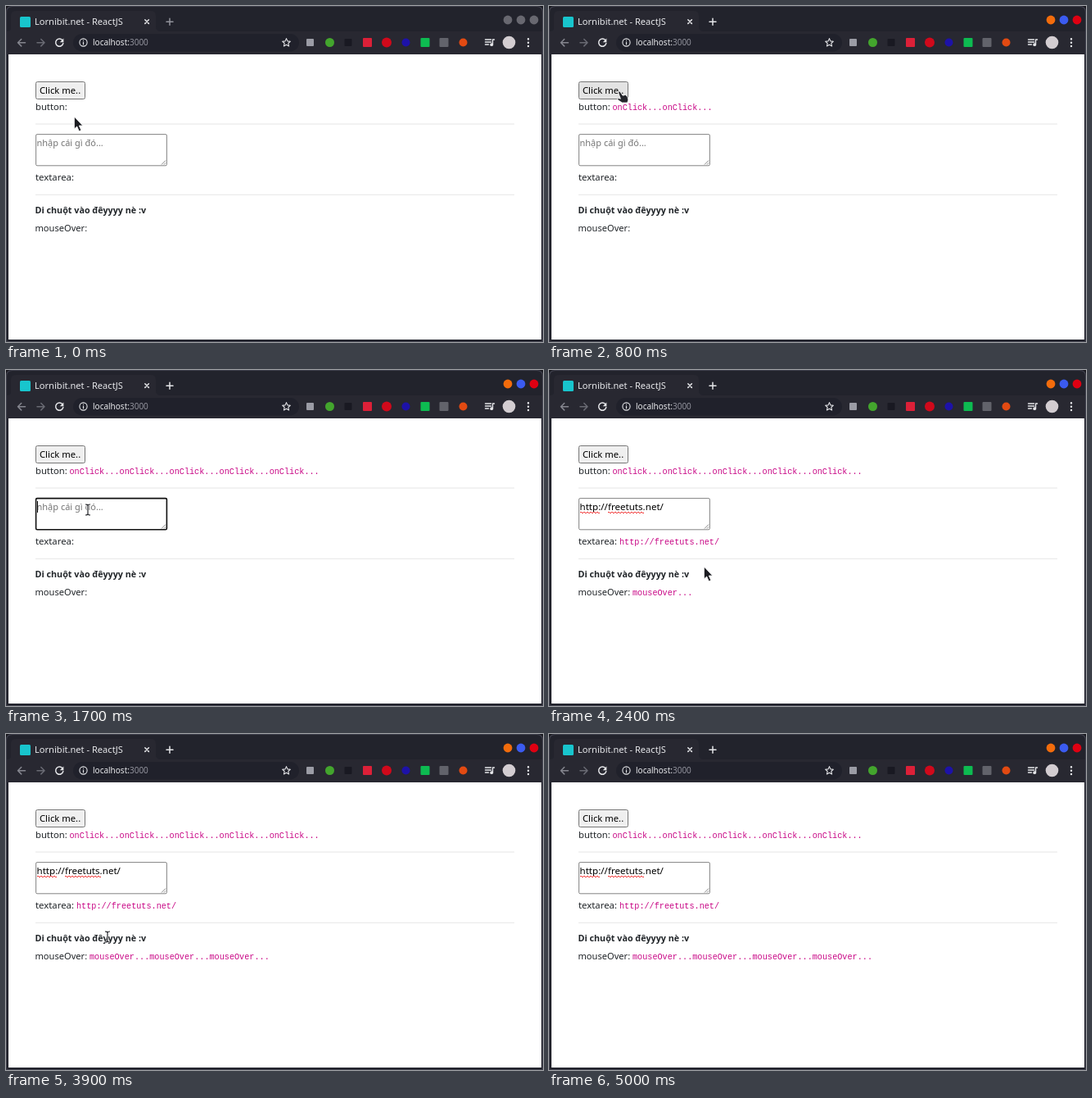
An HTML page that plays this animation: 656 by 410 pixels, repeating every 5600 ms.

```html
<!DOCTYPE html>
<html lang="vi">
<head>
<meta charset="utf-8">
<title>React events</title>
<style>
  html, body { margin: 0; width: 100%; height: 100%; overflow: hidden; background: #17171d; }
  svg { display: block; width: 656px; height: 410px; }
  text { font-family: "Noto Sans", "Open Sans", sans-serif; font-size: 11.25px; fill: #212529; white-space: pre; }
  .code { font-family: "Liberation Mono", monospace; font-size: 10.18px; fill: #c80685; }
  .line { fill: none; stroke: #e4e5e8; stroke-width: 1.5; stroke-linecap: round; stroke-linejoin: round; }
  .rule { fill: #e6e6e6; }
</style>
</head>
<body>
<svg viewBox="0 0 656 410" xmlns="http://www.w3.org/2000/svg">
  <!-- window frame -->
  <rect width="656" height="410" fill="#17171d"/>
  <path d="M0 410V7Q0 0 7 0H649Q656 0 656 7V410Z" fill="#3d3e4a"/>
  <path d="M1 409V8Q1 1 8 1H648Q655 1 655 8V409Z" fill="#22232c"/>
  <path d="M1 31Q6 31 6 27V12Q6 6 12 6H177Q183 6 183 12V25Q183 31 189 31H655V59H1Z" fill="#282831"/>
  <rect x="82" y="34" width="276" height="21.5" rx="10.7" fill="#20212b"/>

  <!-- tab strip -->
  <rect x="17" y="13" width="13" height="13" rx="1.5" fill="#18c5cd"/>
  <text x="35" y="23" style="font-size:11.1px;fill:#e8e9ec">Lornibit.net - ReactJS</text>
  <path class="line" d="M169.8 16.8l4.6 4.6m0-4.6l-4.6 4.6"/>
  <path class="line" id="plus" d="M196 19.3h8m-4-4v8"/>
  <g id="lights"></g>

  <!-- toolbar -->
  <path class="line" d="M23.5 44.7h-9m4.2-4.2l-4.2 4.2 4.2 4.2" style="stroke:#85868f"/>
  <path class="line" d="M38 44.7h9m-4.2-4.2l4.2 4.2-4.2 4.2" style="stroke:#696a73"/>
  <path class="line" d="M69.2 42.2a4.6 4.6 0 1 0 .6 3.4"/>
  <path d="M70.4 39.6v4.6h-4.6z" fill="#e4e5e8"/>
  <circle class="line" cx="94.5" cy="44.5" r="4.6" style="stroke-width:1.1"/>
  <path class="line" d="M94.5 44.2v2.6m0-4.8v.1" style="stroke-width:1.2"/>
  <text x="106" y="48" style="font-size:10px;fill:#e8e9ec">localhost:<tspan fill="#92939d">3000</tspan></text>
  <path class="line" id="star" style="stroke-width:1.1"/>
  <g id="extras"></g>
  <path class="line" d="M585.5 41h7m-7 3h7m-7 3h4" style="stroke-width:1.4"/>
  <path class="line" d="M594.5 47v-6h2" style="stroke-width:1.4"/>
  <circle cx="593.2" cy="47.2" r="1.9" fill="#e4e5e8"/>
  <circle cx="614.5" cy="44.5" r="7.8" fill="#d3cdd1"/>
  <path d="M638 40.3v.1m0 4.2v.1m0 4.2v.1" class="line" style="stroke-width:2.4"/>

  <!-- page -->
  <rect x="3" y="59" width="651" height="348" fill="#fff"/>
  <rect id="btn" x="36.5" y="92.5" width="60" height="21" rx="2" stroke="#767676"/>
  <text x="41" y="107" style="fill:#000">Click me..</text>
  <text x="36" y="127">button:</text>
  <text class="code" id="clicks" x="77.5" y="127"></text>
  <rect class="rule" x="36" y="143.5" width="585" height="1"/>

  <rect id="box" x="36.6" y="156.6" width="159.8" height="38.2" rx="1.5" fill="#fff"/>
  <path d="M190 193.5l5-5m-2 5l2-2" stroke="#777" stroke-width=".9" fill="none"/>
  <text id="hint" x="37.5" y="171" style="font-size:11px;fill:#757575">nhập cái gì đó...</text>
  <text id="typed" x="37.5" y="171" style="font-size:11.6px;fill:#000"></text>
  <g id="waves" fill="none" stroke="#f03a3a" stroke-width="1"></g>
  <rect id="caret" y="160" width="1" height="14" fill="#000"/>
  <text x="36" y="213" style="font-size:11.35px">textarea:</text>
  <text class="code" id="echo" x="86" y="213"></text>
  <rect class="rule" x="36" y="229.8" width="585" height="1"/>

  <text x="35.5" y="253" style="font-size:10.75px;font-weight:600">Di chuột vào đêyyyy nè :v</text>
  <text x="35.5" y="275" style="font-size:11.1px">mouseOver:</text>
  <text class="code" id="overs" x="102" y="275"></text>

  <!-- pointers -->
  <g id="pointer" stroke-linejoin="round">
    <path id="arrow" d="M-.6 0V15L2.7 12 5.3 17.8 7.9 16.6 5.3 11H9.8Z" fill="#1c1d22" stroke="#fff" stroke-width=".8"/>
    <path id="hand" d="M-1.2 .8Q-.4-.8 1 .6L4 5.2 7.5 4.4 10 6.8 10.8 10.5 9.8 14H3.4L-2 10.6Q-3.4 8.4-1 8.6L1.4 9.2-1 2.6Z" fill="#24252b" stroke="#fff" stroke-width=".8"/>
    <g id="beam" fill="none">
      <path d="M-3-6Q0-6 0-4.5Q0-6 3-6M0-4.5V5.5M-3 7Q0 7 0 5.5Q0 7 3 7" stroke="#fff" stroke-width="2.6"/>
      <path d="M-3-6Q0-6 0-4.5Q0-6 3-6M0-4.5V5.5M-3 7Q0 7 0 5.5Q0 7 3 7" stroke="#25262b" stroke-width="1.2"/>
    </g>
  </g>
</svg>
<script>
const LOOP = 5600, STEP = 100;
const NS = "http://www.w3.org/2000/svg";
const el = id => document.getElementById(id);
const show = (id, on) => el(id).setAttribute("visibility", on ? "visible" : "hidden");
const set = (node, attrs) => { for (const k in attrs) node.setAttribute(k, attrs[k]); };

function add(parent, tag, attrs) {
  const node = document.createElementNS(NS, tag);
  set(node, attrs);
  return el(parent).appendChild(node);
}

// Plain marks in the toolbar: shape, x, size, colour
[
  ["sq", 371.5, 9, "#9b9ca5"], ["dot", 395.5, 11, "#43a52d"], ["sq", 418, 9, "#191922"],
  ["sq", 441.5, 11, "#dc2038"], ["dot", 465, 12, "#d0091b"], ["dot", 488.5, 10, "#1d12a8"],
  ["sq", 512, 11, "#0dbb51"], ["sq", 535, 11, "#62636b"], ["dot", 558.5, 10, "#e24a12"]
].forEach(([kind, x, size, fill]) => {
  const r = size / 2, y = 44.5;
  if (kind === "dot") add("extras", "circle", { cx: x, cy: y, r, fill });
  else add("extras", "rect", { x: x - r, y: y - r, width: size, height: size, rx: 1, fill });
});

const lights = ["#f36c0c", "#3b5bf0", "#df0012"].map((color, i) =>
  ({ color, node: add("lights", "circle", { cx: 613 + 16 * i, cy: 17, r: 5.4 }) }));

const star = Array.from({ length: 10 }, (_, i) => {
  const a = Math.PI * (i / 5 - 0.5), r = i % 2 ? 2.4 : 5.2;
  return (342.5 + r * Math.cos(a)).toFixed(1) + " " + (44.8 + r * Math.sin(a)).toFixed(1);
});
el("star").setAttribute("d", "M" + star.join("L") + "Z");

const wave = (from, to) => {
  let d = `M${from} 174`;
  for (let x = from, up = 1; x < to; x += 2, up = -up) d += `q1 ${-2 * up} 2 0`;
  return d;
};
const waves = [[38, 61, 5], [72, 115, 16]].map(([from, to, min]) =>
  ({ min, node: add("waves", "path", { d: wave(from, to) }) }));

// Pointer path: time, x, y
const path = [
  [0, 84, 135], [100, 84, 130], [300, 86, 106], [400, 86, 104], [1200, 86, 104],
  [1300, 88, 112], [1500, 97, 150], [1600, 100, 170], [2100, 100, 170],
  [2200, 130, 186], [2300, 172, 222], [2400, 190, 240], [2500, 203, 252],
  [2600, 192, 266], [2700, 160, 272], [2800, 132, 265], [2900, 117, 254],
  [3100, 110, 242], [3200, 108, 230], [3300, 112, 227], [3400, 118, 235],
  [3500, 123, 243], [3900, 124, 247], [4000, 150, 250], [4100, 184, 248],
  [4200, 190, 257], [4300, 176, 266], [4400, 150, 266], [4500, 133, 254],
  [4700, 132, 247], [4800, 118, 247], [4900, 58, 247]
];
const clickTimes = [500, 700, 900, 1000, 1200];
const overTimes = [2400, 2900, 3500, 4500];
const address = "http://freetuts.net/";
const CHAR = 6.11;

const count = (times, t) => times.filter(x => t >= x).length;
const inside = (x, y, l, t, r, b) => x >= l && x <= r && y >= t && y <= b;

function pointAt(t) {
  const i = path.findIndex(p => p[0] > t);
  if (i < 0) return path[path.length - 1].slice(1);
  const [t0, x0, y0] = path[i - 1], [t1, x1, y1] = path[i];
  const k = (t - t0) / (t1 - t0);
  return [x0 + (x1 - x0) * k, y0 + (y1 - y0) * k];
}

function draw(t) {
  const clicks = count(clickTimes, t), overs = count(overTimes, t);
  const chars = Math.max(0, Math.min(address.length, (t - 1800) / STEP * 5));
  const focused = t >= 1700 && t < 2400;
  const [x, y] = pointAt(t);

  const onButton = inside(x, y, 36, 92, 97, 114);
  const onText = inside(x, y, 36, 156, 197, 195) ||
    inside(x, y, 36, 238, 172, 259) ||
    inside(x, y, 36, 116, 77 + clicks * 10 * CHAR, 130) ||
    inside(x, y, 36, 263, 102 + overs * 12 * CHAR, 279);

  // the window wakes up with the first click
  lights.forEach(l => l.node.setAttribute("fill", clicks ? l.color : "#686870"));
  el("plus").style.stroke = clicks ? "#e4e5e8" : "#92939b";
  el("btn").setAttribute("fill", onButton ? "#e3e3e3" : "#efefef");
  set(el("box"), { stroke: focused ? "#101010" : "#767676", "stroke-width": focused ? 1.6 : 0.9 });

  el("clicks").textContent = "onClick...".repeat(clicks);
  el("overs").textContent = "mouseOver...".repeat(overs);
  el("typed").textContent = el("echo").textContent = address.slice(0, chars);
  show("hint", chars === 0);
  waves.forEach(w => w.node.setAttribute("visibility", chars >= w.min ? "visible" : "hidden"));
  show("caret", focused);
  el("caret").setAttribute("x", 38 + (chars ? el("typed").getComputedTextLength() : 0));

  const visible = t < 5000;
  show("arrow", visible && !onButton && !onText);
  show("hand", visible && onButton);
  show("beam", visible && onText);
  el("pointer").setAttribute("transform", `translate(${x} ${y})`);
}

const start = performance.now();
function tick() {
  const t = (performance.now() - start) % LOOP;
  draw(Math.floor(t / STEP) * STEP);
  requestAnimationFrame(tick);
}
draw(0);
requestAnimationFrame(tick);
</script>
</body>
</html>
```
